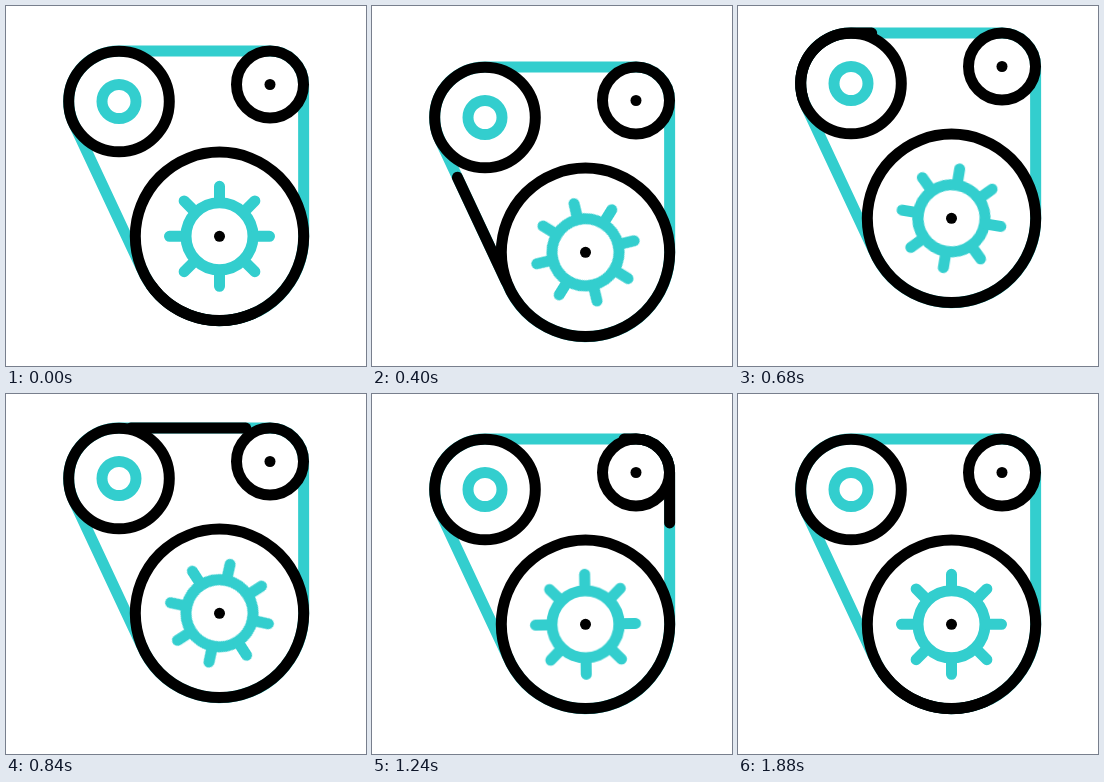
Recreate the animation shown at these times as an HTML page. Size 360 by 360 pixels, loop 2000 ms.

```html
<!DOCTYPE html>
<html lang="en">
<head>
<meta charset="utf-8">
<title>Belt drive</title>
<style>
  html, body { margin: 0; width: 100%; height: 100%; overflow: hidden; background: #fff; }
  svg { display: block; width: 100vw; height: 100vh; fill: none; stroke-width: 11; stroke-linecap: round; }
  .teal { stroke: #33cece; }
  .black { stroke: #000; }
  .dot { fill: #000; }

  .engine { animation: shake 2s infinite; }
  .gear { transform-origin: 213.5px 230.3px; animation: spin 2s infinite; }
  .dash { stroke-dasharray: 115 734; animation: travel 2s linear infinite; }
  .engine, .gear { animation-timing-function: cubic-bezier(.333, 0, .667, 1); }

  @keyframes shake {
    0%, 6% { transform: translateY(0); }
    20% { transform: translateY(16px); }
    34% { transform: translateY(-18px); }
    53%, 100% { transform: translateY(0); }
  }
  @keyframes spin {
    0%, 4.35% { transform: rotate(0deg); }
    90.25%, 100% { transform: rotate(360deg); }
  }
  @keyframes travel {
    0%, 6% { stroke-dashoffset: -97; }
    14% { stroke-dashoffset: -177; }
    26% { stroke-dashoffset: -292; }
    42% { stroke-dashoffset: -505; }
    62% { stroke-dashoffset: -632; }
    78% { stroke-dashoffset: -832; }
    94%, 100% { stroke-dashoffset: -946; }
  }
</style>
</head>
<body>
<svg viewBox="0 0 360 360">
  <defs>
    <path id="belt" pathLength="849" d="M297.7 230.3A84.2 84.2 0 0 1 137.2 266L67.4 116.8A50.3 50.3 0 0 1 113 45.1H264A33.5 33.5 0 0 1 297.6 78.5Z"/>
    <path id="teeth" d="M213.5 196.3V180.3M213.5 264.3V280.3M179.5 230.3H163.5M247.5 230.3H263.5"/>
  </defs>
  <g class="engine">
    <use href="#belt" class="teal"/>
    <g class="teal">
      <circle cx="113" cy="95.5" r="17"/>
      <g class="gear">
        <circle cx="213.5" cy="230.3" r="33.5"/>
        <use href="#teeth"/>
        <use href="#teeth" transform="rotate(45 213.5 230.3)"/>
      </g>
    </g>
    <g class="black">
      <circle cx="113" cy="95.5" r="50.3"/>
      <circle cx="264" cy="78.5" r="33.5"/>
      <circle cx="213.5" cy="230.3" r="84.2"/>
      <use href="#belt" class="dash"/>
    </g>
    <circle class="dot" cx="264" cy="78.5" r="5.5"/>
    <circle class="dot" cx="213.5" cy="230.3" r="5.5"/>
  </g>
</svg>
</body>
</html>
```
